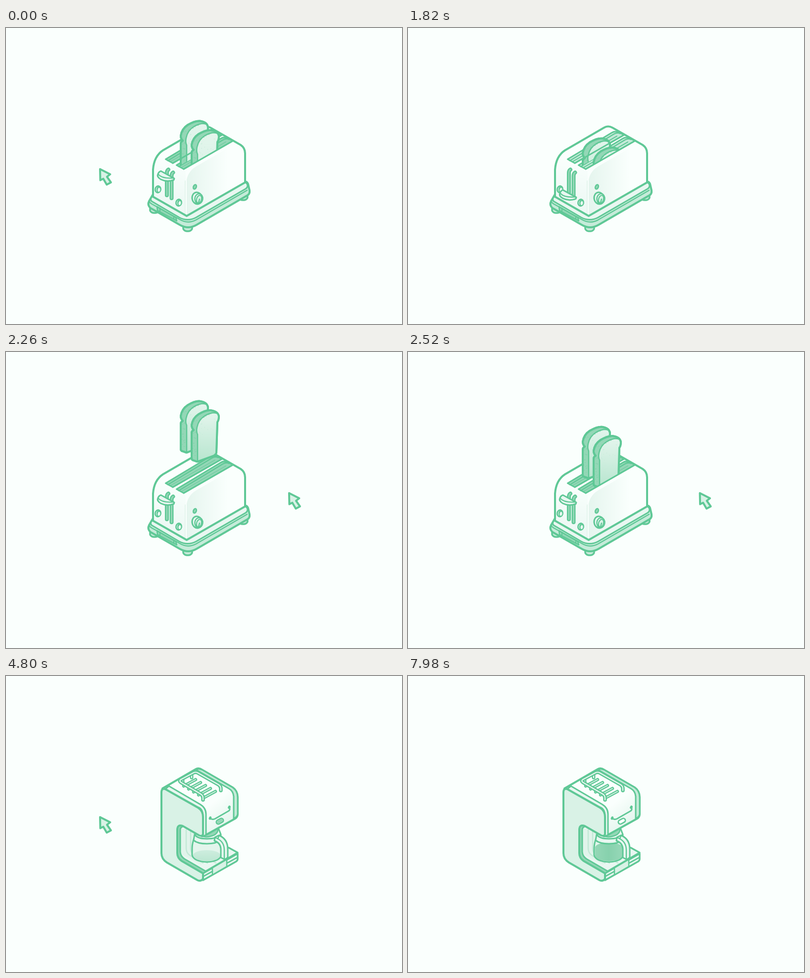
An HTML page with a canvas that plays this animation: 800 px wide and 600 px high, repeating every 8 s.

```html
<!DOCTYPE html>
<html lang="en">
<head>
<meta charset="utf-8">
<title>Kitchen loop</title>
<style>
  html, body { margin: 0; width: 100%; height: 100%; overflow: hidden; background: #fafffd; }
  canvas { display: block; }
</style>
</head>
<body>
<canvas id="stage" width="800" height="600"></canvas>
<script>
const ctx = document.getElementById('stage').getContext('2d');
const LOOP = 8000, COFFEE_START = 4800;
const BG = '#fafffd', LINE = '#5fc896', MID = '#93d7b6', SOFT = '#c5ebd9', PALE = '#d9f2e6', LIGHT = '#e9f7f1';

const clamp = v => Math.max(0, Math.min(1, v));
const span = (t, a, b) => clamp((t - a) / (b - a));
const mix = (a, b, k) => a + (b - a) * k;
const cubicIn = p => p ** 3;
const cubicOut = p => 1 - (1 - p) ** 3;

function shape(path, fill, width = 0, stroke = LINE) {
  const p = new Path2D(path);
  if (fill) { ctx.fillStyle = fill; ctx.fill(p); }
  if (width) { ctx.lineWidth = width; ctx.strokeStyle = stroke; ctx.stroke(p); }
}

function oval(x, y, rx, ry, fill, width = 0, angle = 0) {
  ctx.beginPath();
  ctx.ellipse(x, y, rx, ry, angle, 0, Math.PI * 2);
  if (fill) { ctx.fillStyle = fill; ctx.fill(); }
  if (width) { ctx.lineWidth = width; ctx.strokeStyle = LINE; ctx.stroke(); }
}

function tube(path, outer, inner, fill) {
  shape(path, null, outer);
  shape(path, null, inner, fill);
}

function gradient(x0, y0, x1, y1, ...colors) {
  const g = ctx.createLinearGradient(x0, y0, x1, y1);
  colors.forEach((c, i) => g.addColorStop(i / (colors.length - 1), c));
  return g;
}

function at(x, y, draw) {
  ctx.save();
  ctx.translate(x, y);
  draw();
  ctx.restore();
}

function withAlpha(alpha, draw) {
  ctx.save();
  ctx.globalAlpha *= alpha;
  draw();
  ctx.restore();
}

function seeded(seed) {
  return () => (seed = (seed * 16807) % 2147483647) / 2147483647;
}

function cursor(x) {
  at(x, 0, () => shape('M190 286L210.5 296.5L204 301.5L212 313L203.5 317.5L196.5 305.5L190.5 308.5Z', PALE, 4));
}

// Toaster

const CRUST = 'M375 304V253Q375 249 379 247Q375 243 375 237Q377 223 389 215Q404 206 414 207Q428 209 430 219Q430 227 427 231L425 293Q424 297 420 299L390 310Q386 312 383 310L377 308Q375 307 375 304Z';
const CRUMB_FACE = 'M387 310V256Q384 250 386 241Q389 226 402 218Q418 209 428 214Q432 222 427 231L425 293Q424 297 420 299L390 310Z';

function toast(toasted) {
  shape(CRUST, MID, 4);
  shape(CRUMB_FACE, gradient(0, 212, 0, 308, '#e3f5ec', toasted ? '#b9e6d0' : '#d9f2e6'), 2.5);
  const rnd = seeded(41);
  for (let i = 0; i < 22; i++) {
    oval(391 + rnd() * 32, 224 + rnd() * 70, 0.8, 0.8, SOFT);
  }
  for (let i = 0; i < 16; i++) {
    oval(377 + rnd() * 7, 250 + rnd() * 50, 0.8, 0.8, '#7bcfa6');
  }
  for (let i = 0; i < 9; i++) {
    oval(380 + i * 4.7 + rnd() * 2, 229 - i * 2.3 + rnd() * 2, 0.8, 0.8, '#7bcfa6');
  }
  shape(CRUST, null, 4);
}

function slot(lit) {
  const hole = 'M344.5 278L434 224Q443 218 458 229L359 286Z';
  shape(hole, MID);
  withAlpha(lit, () => shape(hole, SOFT));
  shape('M349 281L438 227Q444 223 451 226', null, 2.5);
  shape('M354 283L444 231', null, 2, lit > 0.5 ? LINE : '#79cda5');
  shape(hole, null, 3);
}

function slottedToast(dy, toasted, dx, oy, lineY) {
  ctx.save();
  ctx.beginPath();
  ctx.moveTo(300, 0);
  ctx.lineTo(520, 0);
  ctx.lineTo(520, 194.5 + lineY);
  ctx.lineTo(300, 320 + lineY);
  ctx.clip();
  ctx.translate(dx, oy + dy);
  toast(toasted);
  ctx.restore();
  at(dx, lineY, () => shape('M359 286L458 229', null, 3));
}

function knob(x, y) {
  oval(x, y, 5.5, 6.8, LIGHT, 2.8, 0.2);
  shape(`M${x} ${y - 5}Q${x - 4} ${y} ${x} ${y + 5}`, null, 2);
  oval(x + 2, y + 1, 3.5, 5, LIGHT, 2, 0.2);
}

function foot(x, y) {
  shape(`M${x - 9} ${y - 5}V${y + 1}Q${x - 7} ${y + 6} ${x} ${y + 6}Q${x + 7} ${y + 6} ${x + 9} ${y + 1}V${y - 5}Z`, SOFT, 3.5);
}

function toasterBase() {
  foot(300, 369);
  foot(367, 406);
  foot(479, 343);
  shape('M297 337L289 351Q285 359 292 365L351 399Q368 409 385 399L488 339Q493 336 492 329L489 316Q487 311 482 311L365 378Z', SOFT, 4);
  shape('M305 362L343 384L345 391L306 370Z', MID, 2.5);
  shape('M311 365V372M339 382V388', null, 2);
  shape('M296 341Q290 346 294 351L350 384Q367 393 384 384L484 326Q490 322 487 316L482 311L365 378Z', LIGHT, 3);
  shape('M290 352Q290 354 295 357L351 388Q367 398 384 389L487 329', null, 2.5);
}

function toasterBody() {
  const body = 'M297 342V287Q299 260 317 248L396 202Q404 197 413 202L474 237Q483 243 483 254V313L365 381Z';
  shape(body, BG);
  ctx.save();
  ctx.clip(new Path2D(body));
  shape('M297 342V287Q300 262 316 251L355 277Q364 283 363 300V381Z', gradient(330, 265, 322, 350, BG, '#eef9f5'));
  shape('M365 381V308Q368 290 385 280L449 243V333Z', gradient(365, 0, 448, 0, '#e5f5ee', BG));
  shape('M362 310V379', null, 2, '#e3f4ec');
  ctx.restore();
  shape(body, null, 4);
}

function toasterControls(lever) {
  for (const [x, y] of [[325, 0], [334.5, 6]]) {
    tube(`M${x} ${339 + y}V${294 + y}Q${x} ${289 + y} ${x + 3} ${287 + y}`, 8, 3, MID);
  }
  knob(307, 327);
  at(0, lever * 39, () => {
    shape('M313 290L340 305L339 308Q325 313 313 307Q304 302 307 296Q309 291 313 290Z', LIGHT, 3);
    shape('M308 297Q316 306 339 304', null, 2.3);
  });
  knob(349, 354);
  oval(381.5, 322, 3, 4.7, MID, 2.5, 0.4);
  oval(386, 345, 10, 12, LIGHT, 3, -0.2);
  oval(389.5, 346, 8, 10, LIGHT, 2.5, 0.1);
  oval(390, 347, 5, 8, PALE, 2.2, 0.3);
  shape('M391 347L389 354', null, 2.5);
}

function toastOffset(t) {
  if (t < 1820) return 36 * cubicIn(span(t, 0, 660));
  if (t < 2180) return mix(36, -92, 1 - (1 - span(t, 1820, 2180)) ** 2);
  if (t < 2620) return -92 * (1 - span(t, 2180, 2620) ** 2);
  return 4 * Math.sin(Math.PI * span(t, 2620, 2800));
}

function toasterScene(t) {
  const toasted = t > 1000;
  const dy = toastOffset(t);
  const lever = t < 1820 ? cubicIn(span(t, 0, 660)) : 1 - cubicOut(span(t, 1820, 2000));
  const lit = clamp(dy / 36) * (t < 1840 ? 1 : 0.5);
  const jolt = t > 1820 && t < 2140 ? Math.sin((t - 1820) / 32) * (1 - span(t, 1820, 2140)) : 0;

  if (t < 800) cursor(200 * cubicIn(t / 800));
  else if (t > 1820) cursor(200 + 200 * cubicOut(span(t, 1820, 2620)));

  at(0, jolt, () => {
    toasterBase();
    toasterBody();
    at(-22, -12, () => slot(lit));
    slot(lit);
    slottedToast(dy, toasted, -22, -18.5, -12);
    slottedToast(dy, toasted, 0, 0, 0);
    toasterControls(lever);
  });
}

// Coffee maker

function machineBack() {
  // base and cavity
  shape('M346 312L400 300L430 337L450 348L468 358V374L398 414L346 380Z', LIGHT);
  shape('M352 306L395 326V383L352 360Z', '#e1f4eb');
  for (const x of [364, 373, 390]) {
    shape(`M${x} 312V349Q${x} 359 ${x + 8} 364L${x + 34} 379`, null, 2.5, '#c3e9d7');
  }
  shape('M450 348L468 358L398 399', null, 3.5);
  shape('M398 400L468 360V371Q468 374 465 376L398 414Z', LIGHT, 3.5);
  shape('M417 389L446 372V386L417 403Z', PALE, 2.5);
  shape('M399 406L417 396M447 379L467 368', null, 2.8);
}

function pot(t) {
  const glass = 'M380 329Q376 340 376 349V363Q379 376 406 377Q432 376 435 363V346Q434 338 430 331Z';
  shape(glass, '#e3f5ec');

  const rise = span(t, 7040, 7980);
  const dark = span(t, 7840, 7980);
  const top = mix(352, 338.5, rise);
  const surface = top + mix(11, 9, rise);
  const liquid = `M378 ${surface}A27.5 10 0 0 1 433 ${surface}V364Q430 375 406 375Q380 375 378 364Z`;
  shape(liquid, gradient(0, 350, 0, 376, '#d0eee0', '#bbe6d1'));
  withAlpha(dark, () => shape(liquid, gradient(378, 0, 433, 0, '#94d7b6', '#87d1ad', '#96d8b8')));

  ctx.save();
  ctx.beginPath();
  ctx.rect(403, 341, 6, Math.max(0, top + 0.5 - 341));
  ctx.clip();
  for (const start of [5820, 6220, 6430, 6630, 6830]) {
    const p = (t - start) / 220;
    if (p > 0 && p < 1) oval(406, mix(338, 355, p * p), 1.8, 3, MID);
  }
  if (t > 7020) shape('M406 340V353', null, 3.5, MID);
  ctx.restore();

  shape(glass, null, 3);
  // lid, collar and handle
  shape('M386 314L429 308L434 321Q425 333 405 332Q388 331 382 323Z', LIGHT, 3);
  shape('M393 319L428 308Q430 321 413 325Q402 328 395 324Z', MID, 2.5);
  shape('M381 321Q386 330 406 330Q426 330 434 322L433 333Q424 340 406 340Q387 340 379 333Z', LIGHT, 3);
  shape('M422 327L430 323Q448 330 448 351V367Q445 372 440 371L434 368V350Q433 338 421 334Z', LIGHT, 3);
  shape('M422 327L428 330Q441 337 441 353V370M428 330L430 324', null, 2.5);
}

function machineHead() {
  shape('M316 228L383 189Q389 185 396 190L458 226Q468 233 468 246V280Q468 286 463 289L404 322L396 325Z',
    gradient(378, 225, 438, 302, BG, BG, '#e6f6ef'), 4);
  shape('M389 188L396 190L458 226Q468 233 468 246V280Q467 286 460 289V244Q459 233 450 228L384 190Z', SOFT, 3);
  shape('M398 284Q398 270 388 266L322 229L329 223L392 260Q404 267 404 280V322L398 325Z', LIGHT, 3);
}

function machineSide() {
  shape('M346 312Q346 302 354 303L358 305Q352 306 352 312V357Q353 366 361 371L404 396L398 400L355 375Q346 370 346 359Z', MID, 3);
  shape('M314 236Q314 226 323 230L388 267Q398 273 398 286V320Q397 326 390 323L357 304Q346 300 346 312V359Q346 369 355 375L398 400V411Q394 417 387 414L325 378Q314 371 314 359Z', PALE, 4);
}

function rack() {
  for (let i = 0; i < 5; i++) {
    at(i * 10, i * 6, () => tube('M359 223L383 210', 6.5, 1.8, PALE));
  }
  tube('M375 198V206M357 210V215', 7, 2, BG);
  tube('M398 251V247Q398 242 393 239L354 216Q349 213 353 210L379 196Q383 194 387 196L429 220Q434 223 434 228V232', 7.5, 2.2, LIGHT);
}

function headFront(lamp) {
  shape('M413 289Q418 292 423 289L449 274Q453 272 452 268', null, 2.8);
  oval(412.5, 288, 2.2, 3.2, LINE, 1, 0.4);
  oval(451, 266, 2.2, 3.2, LINE, 1, 0.4);
  const pill = 'M429 296L435 292.7';
  tube(pill, 11, 5.5, BG);
  withAlpha(lamp, () => shape(pill, null, 5.5, MID));
}

function coffeeScene(t) {
  const local = t - COFFEE_START;
  if (local < 800) cursor(200 * cubicIn(local / 800));
  machineBack();
  pot(t);
  machineHead();
  machineSide();
  rack();
  headFront(1 - span(t, 5420, 5560));
}

function frame(now) {
  const t = now % LOOP;
  ctx.fillStyle = BG;
  ctx.fillRect(0, 0, 800, 600);
  ctx.lineJoin = ctx.lineCap = 'round';
  if (t < COFFEE_START) toasterScene(t);
  else coffeeScene(t);
  requestAnimationFrame(frame);
}

const begin = performance.now();
requestAnimationFrame(function tick() {
  frame.call(null, Math.max(0, performance.now() - begin));
});
</script>
</body>
</html>
```
